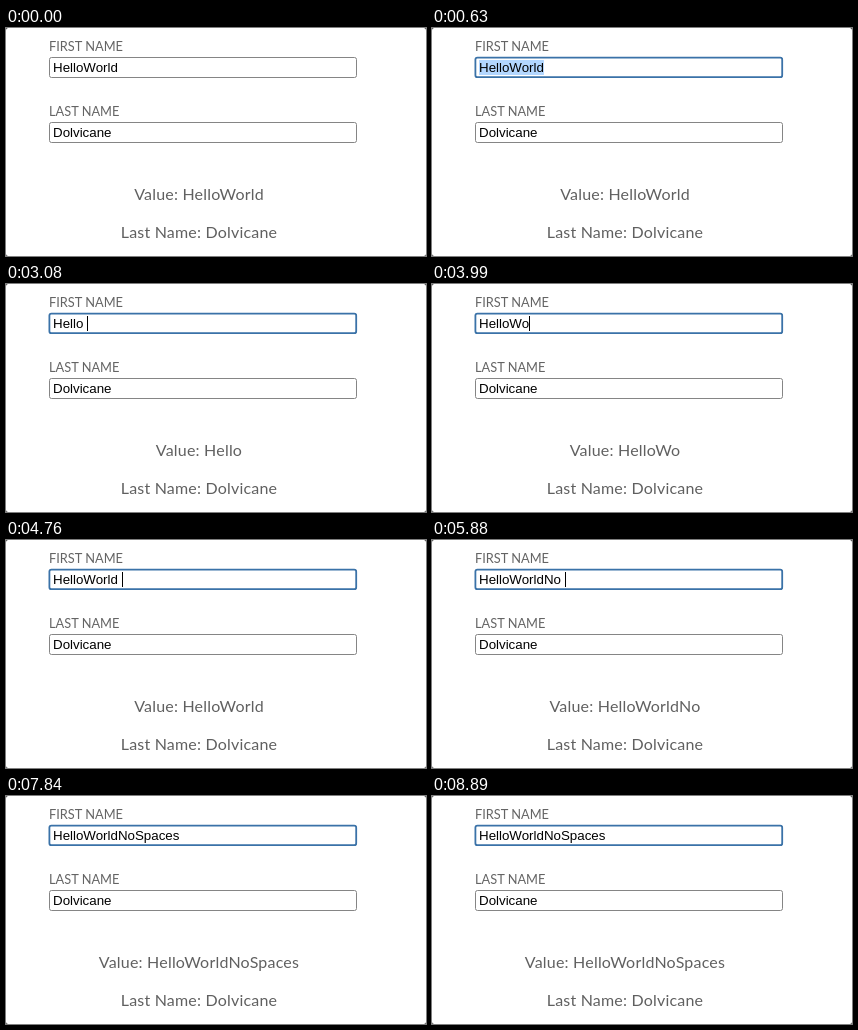
An HTML page for the animation above (9.03 s loop, 420 by 228 pixels).

```html
<!DOCTYPE html>
<html lang="en">
<head>
<meta charset="utf-8">
<title>Form without spaces</title>
<style>
  html, body { margin: 0; width: 100%; height: 100%; overflow: hidden; background: #444; }
  svg { display: block; width: 420px; height: 228px; }
  text { white-space: pre; }
  .label { font: 12.8px Lato, sans-serif; fill: #646464; }
  .output { font: 16px Lato, sans-serif; fill: #606060; text-anchor: middle; letter-spacing: 0.2px; }
  .input { font: 13.333px "Liberation Sans", Arial, sans-serif; }
  .box { fill: #fff; stroke: #858585; }
</style>
</head>
<body>
<svg viewBox="0 0 420 228">
  <rect width="420" height="228" rx="2.5" fill="#fff"/>

  <text class="label" x="43" y="23">FIRST NAME</text>
  <rect class="box" x="43.5" y="29.5" width="307" height="20" rx="2"/>
  <rect id="ring" x="43.4" y="29.6" width="306.8" height="19.6" rx="2" fill="#fff" stroke="#3a72a8" stroke-width="1.8"/>
  <rect id="selection" x="47" y="32" height="15" fill="#b3d7ff"/>
  <text class="input" id="field" x="47" y="44"></text>
  <rect id="caret" y="32" width="1" height="15"/>

  <text class="label" x="43" y="88">LAST NAME</text>
  <rect class="box" x="43.5" y="94.5" width="307" height="20" rx="2"/>
  <text class="input" x="47" y="109">Dolvicane</text>

  <text class="output" id="value" x="193" y="172"></text>
  <text class="output" x="193" y="210">Last Name: Dolvicane</text>
</svg>
<script>
  const LOOP = 9030, FOCUS = 490, SELECT = 630, CLEAR = 1680;

  // Keystrokes by time; "|" toggles the blinking caret.
  const keys = [
    [2030, "H"], [2240, "e"], [2450, "l"], [2590, "l"], [2800, "o"], [3080, " "],
    [3500, "W"], [3990, "o"], [4130, "r"], [4200, "l"], [4340, "d"], [4760, " "],
    [5250, "|"], [5530, "N"], [5670, "o"], [5880, " "],
    [6300, "S"], [6440, "p"], [6510, "a"], [6650, "c"], [6860, "e"], [6930, "s"],
    [7280, " "], [7840, "|"], [8330, "|"], [8820, "|"],
  ];

  const [ring, selection, field, caret, value] =
    ["ring", "selection", "field", "caret", "value"].map(id => document.getElementById(id));

  const show = (element, visible) => element.setAttribute("visibility", visible ? "visible" : "hidden");

  function stateAt(time) {
    let text = time < CLEAR ? "HelloWorld" : "";
    let caretOn = time >= FOCUS && (time < SELECT || time >= CLEAR);
    for (const [at, key] of keys) {
      if (time < at) break;
      if (key === "|") {
        caretOn = !caretOn;
      } else {
        text = text.trim() + key;
        caretOn = true;
      }
    }
    return { text, caretOn };
  }

  function draw(time) {
    const { text, caretOn } = stateAt(time);
    field.textContent = text || "Input";
    field.setAttribute("fill", text ? "#000" : "#757575");
    value.textContent = ("Value: " + text).trim();

    const width = text ? field.getComputedTextLength() : 0;
    caret.setAttribute("x", Math.round(47 + width));
    selection.setAttribute("width", width);
    show(caret, caretOn);
    show(ring, time >= FOCUS);
    show(selection, time >= SELECT && time < CLEAR);
  }

  const start = performance.now();
  function tick() {
    draw((performance.now() - start) % LOOP);
    requestAnimationFrame(tick);
  }
  tick();
</script>
</body>
</html>
```
